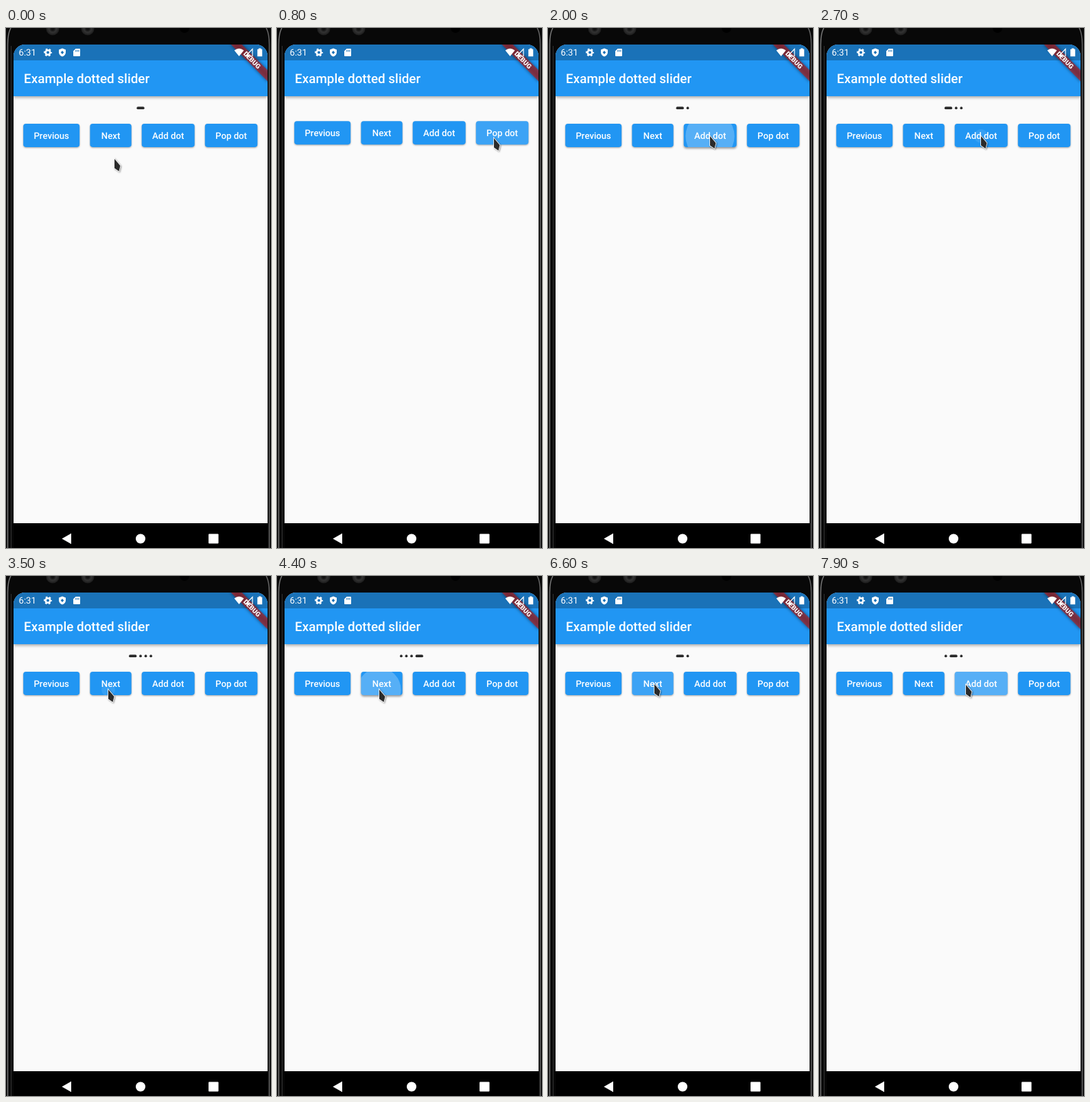
Write an HTML page that moves like this. It is 386x755 px and loops after 8 s.

```html
<!DOCTYPE html>
<html lang="en">
<head>
<meta charset="utf-8">
<title>Example dotted slider</title>
<style>
  html, body { margin: 0; width: 100%; height: 100%; overflow: hidden; background: #000; }
  svg { display: block; width: 386px; height: 755px; font-family: Roboto, sans-serif; fill: #fff; text-rendering: geometricPrecision; }
  .bar { filter: drop-shadow(0 2px 2px #0005); }
  .button { fill: #2196f3; filter: drop-shadow(0 1px 1px #0005); }
  .button.down { filter: drop-shadow(0 2px 1.5px #0006); }
  .label { font: 500 13.19px Roboto, sans-serif; text-anchor: middle; }
  .glow { filter: blur(2.8px); }
  #cursor { fill: #2b2b2b; stroke: #fff; stroke-width: 1.6; paint-order: stroke; filter: drop-shadow(1px 1px 1px #0006); }
</style>
</head>
<body>
<svg viewBox="0 0 386 755">
  <defs>
    <clipPath id="screen"><path d="M11 755V41a17 17 0 0 1 17-17H364a17 17 0 0 1 17 17V755z"/></clipPath>
    <radialGradient id="lens"><stop offset=".2" stop-color="#111"/><stop offset=".55" stop-color="#333"/><stop offset="1" stop-color="#1c1c1c"/></radialGradient>
  </defs>

  <!-- Phone body -->
  <rect width="386" height="755" fill="#080808"/>
  <path d="M2.5 755V24Q2.500 8 7 0" fill="none" stroke="#777" stroke-width="1.5"/>
  <path d="M7.5 755V26" stroke="#333"/>
  <path d="M383.500 755V24Q383.500 8 379 0" fill="none" stroke="#666" stroke-width="1.5"/>
  <circle cx="68" cy="1" r="9.500" fill="url(#lens)"/>
  <circle cx="119" cy="1" r="9.500" fill="url(#lens)"/>
  <circle cx="260" cy="0" r="7" fill="#000"/>

  <g clip-path="url(#screen)">
    <rect x="11" y="24" width="370" height="695" fill="#fafafa"/>
    <rect class="bar" x="11" y="24" width="370" height="75" fill="#2196f3"/>
    <rect x="11" y="24" width="370" height="23" fill="#1a72b8"/>
    <text x="26.1" y="79.700" font-size="18.84" font-weight="500">Example dotted slider</text>

    <g id="buttons"></g>
    <g id="dots" fill="#2b2b2b"></g>

    <g transform="translate(381 24) rotate(45)">
      <rect class="glow" x="-37.7" y="26.4" width="75.400" height="11.3" fill="#000" fill-opacity=".5"/>
      <rect x="-37.7" y="26.4" width="75.400" height="11.3" fill="#b71c1c" fill-opacity=".63"/>
      <text y="35.300" font-size="9.6" font-weight="900" text-anchor="middle">DEBUG</text>
    </g>

    <!-- Status icons -->
    <text x="18.500" y="40.300" font-size="13.2">6:31</text>
    <circle cx="61" cy="35.500" r="3.3" fill="none" stroke="#fff" stroke-width="2.6"/>
    <circle cx="61" cy="35.500" r="5.1" fill="none" stroke="#fff" stroke-width="1.700" stroke-dasharray="2.670" stroke-dashoffset="1.335"/>
    <path d="M82 29.500l5 2v3.800q0 4.500-5 6.200q-5-1.700-5-6.200v-3.800z"/>
    <path d="M82 33l2.300 2.500L82 38l-2.300-2.500z" fill="#1a72b8"/>
    <path d="M101.500 30h5.500q1 0 1 1v9q0 1-1 1h-8q-1 0-1-1v-6.500z"/>
    <path d="M101.700 32v2.500M103.800 32v2.500M105.900 32v2.500" stroke="#1a72b8"/>
    <path d="M332.500 32.500Q339.500 27 346.500 32.500L339.500 41z"/>
    <path d="M349 41L359 30.500V41z" fill="none" stroke="#fff" stroke-width="1.2"/>
    <path d="M353.500 36.500L349 41h4.500z"/>
    <path d="M368 29.500h3.500v1.300h1.700v10.400h-7V30.800h1.800z"/>

    <rect x="11" y="719" width="370" height="36" fill="#000"/>
    <path d="M81.400 741.500L95 733.800V749.200z"/>
    <circle cx="196" cy="741.500" r="7"/>
    <rect x="295" y="734.500" width="14.500" height="14" rx="1"/>
  </g>

  <path id="cursor" d="M0 0L8.500 10L6.500 18L0 13.500z"/>
</svg>

<script>
const LOOP = 8000, STEP = 100;
const DOT = 3.77, PILL = 11.3, GAP = 3.77, CENTER = 196;

const buttons = {
  previous: { text: 'Previous', x: 25.2, w: 82 },
  next: { text: 'Next', x: 122.400, w: 60.300 },
  add: { text: 'Add dot', x: 197.700, w: 77 },
  pop: { text: 'Pop dot', x: 289.800, w: 76.500 }
};

// Press times; the action follows on release.
const RELEASE = 80, FADE_START = 210, FADE_END = 395;
const taps = [
  [500, 'pop'], [1315, 'add'], [1905, 'add'], [2020, 'add'], [2700, 'add'],
  [3500, 'next'], [3900, 'next'], [4320, 'next'], [4900, 'pop'], [5300, 'pop'],
  [6300, 'next'], [6800, 'next'], [7700, 'add']
];

// Pointer path: time, x, y
const path = [
  [0, 158, 190], [100, 230, 178], [200, 285, 162], [300, 285, 162], [400, 316, 160],
  [900, 316, 160], [1200, 236, 157], [3000, 236, 157], [3200, 149, 165],
  [4500, 149, 165], [4700, 317, 157], [5700, 317, 157], [6100, 155, 157],
  [6900, 155, 157], [7100, 304, 158], [7200, 314, 154], [7300, 314, 154],
  [7600, 214, 158], [LOOP, 214, 158]
];

const $ = id => document.getElementById(id);

function add(parent, tag, attrs) {
  const el = document.createElementNS('http://www.w3.org/2000/svg', tag);
  set(el, attrs);
  return parent.appendChild(el);
}

function set(el, attrs) {
  for (const key in attrs) el.setAttribute(key, attrs[key]);
}

for (const [id, b] of Object.entries(buttons)) {
  const box = { x: b.x, y: 139, width: b.w, height: 33.900, rx: 3.8 };
  const clip = add(document.querySelector('defs'), 'clipPath', { id: 'clip-' + id });
  add(clip, 'rect', box);
  b.face = add($('buttons'), 'rect', { ...box, class: 'button' });
  const ink = add($('buttons'), 'g', { 'clip-path': `url(#clip-${id})` });
  b.ripple = add(ink, 'circle', { r: 0 });
  add($('buttons'), 'text', { x: b.x + b.w / 2, y: 160.500, class: 'label' }).textContent = b.text;
}
const dots = Array.from({ length: 4 }, () =>
  add($('dots'), 'rect', { y: 114.300, height: DOT, rx: DOT / 2 }));

function pointer(t) {
  const i = Math.max(1, path.findIndex(p => p[0] >= t));
  const [t0, x0, y0] = path[i - 1], [t1, x1, y1] = path[i];
  const k = (t - t0) / (t1 - t0);
  return [x0 + (x1 - x0) * k, y0 + (y1 - y0) * k];
}

function slider(t) {
  let count = 1, active = 0;
  for (const [time, id] of taps) {
    if (t < time + RELEASE) break;
    if (id === 'add') count++;
    if (id === 'pop') active = Math.max(0, Math.min(active, --count - 1));
    if (id === 'next') active = (active + 1) % count;
  }
  return { count, active };
}

function drawButton(id, t) {
  const { face, ripple } = buttons[id];
  const tap = taps.filter(([time, name]) => name === id && time <= t).pop();
  const age = tap ? t - tap[0] : LOOP;
  const [cx, cy] = pointer(tap ? tap[0] : 0);
  const fade = Math.min(1, 0.4 + age / 100, (FADE_END - age) / (FADE_END - FADE_START));
  set(ripple, { cx, cy, r: 10 + 0.27 * age, opacity: 0.24 * Math.max(0, fade) });
  face.classList.toggle('down', age > 40 && age < 160);
}

function draw(now) {
  const t = Math.floor(now % LOOP / STEP) * STEP;
  const { count, active } = slider(t);
  let x = CENTER - (count * (DOT + GAP) + PILL - DOT) / 2 + GAP / 2;
  dots.forEach((dot, i) => {
    const width = i === active ? PILL : DOT;
    set(dot, { x, width, visibility: i < count ? 'visible' : 'hidden' });
    x += width + GAP;
  });
  set($('buttons'), { transform: `translate(0 ${count ? 0 : -DOT})` });
  Object.keys(buttons).forEach(id => drawButton(id, t));
  set($('cursor'), { transform: `translate(${pointer(t)})` });
}

const start = performance.now();
function frame() {
  draw(performance.now() - start);
  requestAnimationFrame(frame);
}
frame();
</script>
</body>
</html>
```
